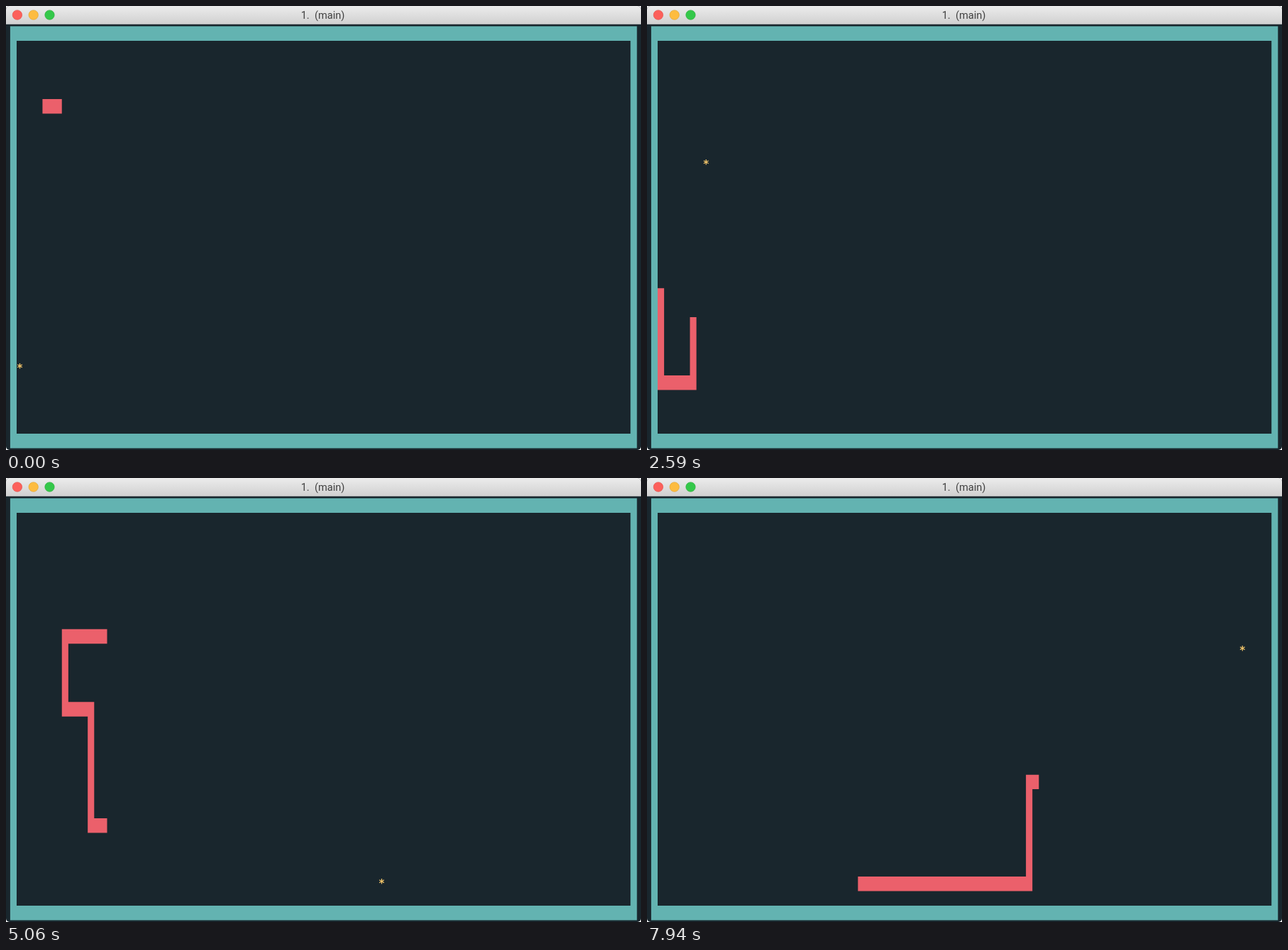
Recreate the animation shown at these times as an HTML page. Size 895 px wide and 625 px high, loop 8000 ms.

```html
<!DOCTYPE html>
<html lang="en">
<head>
<meta charset="utf-8">
<title>Terminal snake</title>
<style>
  html, body { margin: 0; width: 100%; height: 100%; overflow: hidden; background: #fff; }
  svg { display: block; width: 895px; height: 625px; border-radius: 5px; }
  .title { font: 14.6px Roboto, sans-serif; fill: #404040; text-anchor: middle; white-space: pre; }
  .food { font: bold 15px "DejaVu Sans Mono", monospace; fill: #f5c76b; text-anchor: middle; }
  .snake { fill: none; stroke: #eb606b; stroke-width: 1; stroke-linecap: square; stroke-linejoin: miter; }
</style>
</head>
<body>
<svg viewBox="0 0 895 625">
  <defs>
    <linearGradient id="bar" x2="0" y2="1">
      <stop offset="0" stop-color="#ececec"/>
      <stop offset="1" stop-color="#d1d1d1"/>
    </linearGradient>
  </defs>
  <rect width="895" height="625" fill="#19262d"/>
  <rect width="895" height="25" fill="url(#bar)"/>
  <rect y="25" width="895" height="1" fill="#a5a8aa"/>
  <g stroke-width=".6">
    <circle cx="15.9" cy="12.6" r="6.7" fill="#fc605b" stroke="#e2463f"/>
    <circle cx="38.7" cy="12.6" r="6.7" fill="#fdbc40" stroke="#dfa023"/>
    <circle cx="61.5" cy="12.6" r="6.7" fill="#34c84a" stroke="#27aa35"/>
  </g>
  <text class="title" x="446.5" y="18">1.  (main)</text>
  <path fill="#63b3b1" fill-rule="evenodd" d="M5.9 28.5H889.3V622.5H5.9ZM15 49V602H880.2V49Z"/>
  <polyline class="snake" id="snake" transform="translate(15 49) scale(9.107 20.48)"/>
  <text class="food" id="food">*</text>
</svg>
<script>
const LOOP = 8000, FPS = 17, MOVES_PER_FRAME = 8 / 7;
const CELL_W = 9.107, CELL_H = 20.48, LEFT = 15, TOP = 49;
const START_LENGTH = 6, GROWTH = 10, MOVES_BEFORE_START = 2;

const corners = [
  [4, 4], [14, 4], [14, 9], [7, 9], [7, 15], [0, 15], [0, 23], [5, 23], [5, 7], [14, 7],
  [14, 8], [7, 8], [7, 13], [11, 13], [11, 21], [16, 21], [16, 25], [57, 25], [57, 18], [62, 18]
];
const foods = [[0, 22], [7, 8], [56, 25], [90, 9]];

// Every cell the head visits, one per move.
const trail = [corners[0]];
for (const [cx, cy] of corners.slice(1)) {
  let [x, y] = trail[trail.length - 1];
  while (x !== cx || y !== cy) {
    x += Math.sign(cx - x);
    y += Math.sign(cy - y);
    trail.push([x, y]);
  }
}
const meals = foods.slice(0, -1).map(([fx, fy]) => trail.findIndex(([x, y]) => x === fx && y === fy));

const snake = document.getElementById("snake");
const food = document.getElementById("food");

// Screen refreshes fall on a 10 ms clock.
const refreshTime = n => 10 * Math.round(n * 100 / FPS - 0.1);

function refreshAt(t) {
  let n = Math.floor(t * FPS / 1000) + 1;
  while (refreshTime(n) > t) n--;
  return n;
}

function render(t) {
  const head = MOVES_BEFORE_START + Math.floor(refreshAt(t) * MOVES_PER_FRAME + 0.2);
  let length = Math.min(head + 1, START_LENGTH);
  for (const meal of meals) length += Math.min(Math.max(head - meal, 0), GROWTH);

  const body = trail.slice(head + 1 - length, head + 1);
  snake.setAttribute("points", body.map(([x, y]) => `${x + 0.5},${y + 0.5}`).join(" "));

  const [fx, fy] = foods[meals.filter(meal => meal <= head).length];
  food.setAttribute("x", LEFT + (fx + 0.5) * CELL_W);
  food.setAttribute("y", TOP + fy * CELL_H + 15);
}

const start = performance.now();
function tick() {
  render((performance.now() - start) % LOOP);
  requestAnimationFrame(tick);
}
tick();
</script>
</body>
</html>
```
